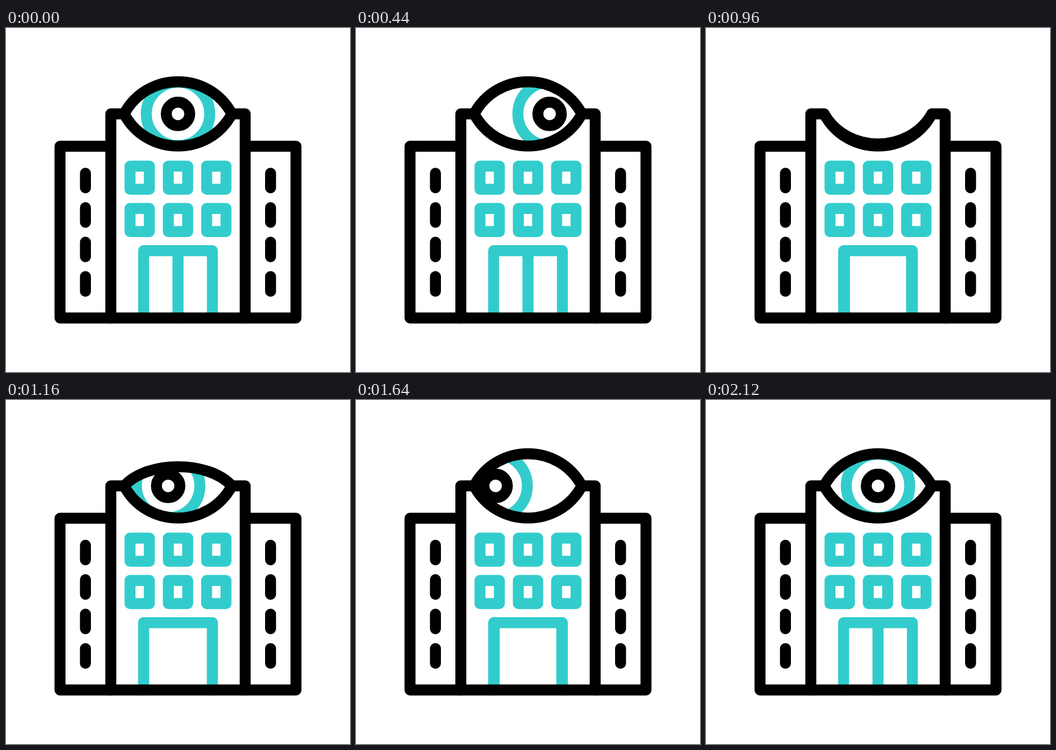
These frames come from a looping animation (640 px wide and 640 px high, 2200 ms). An HTML page:

```html
<!DOCTYPE html>
<html lang="en">
<head>
<meta charset="utf-8">
<title>Watching building</title>
<style>
  html, body { margin: 0; width: 100%; height: 100%; overflow: hidden; background: #fff; }
  svg { display: block; width: 100%; height: 100%; }
  .line { fill: none; stroke: #000; stroke-width: 20.4; stroke-linecap: round; stroke-linejoin: round; }
  .teal { stroke: #3cc; }
</style>
</head>
<body>
<svg viewBox="0 0 640 640">
  <defs>
    <clipPath id="opening"><path id="lens"/></clipPath>
    <rect id="window" width="36" height="43"/>
    <path id="slits" d="M0 270.2v27.2m0 36.9v27.2m0 36.9v27.2m0 36.9v27.2"/>
  </defs>

  <g class="line teal">
    <use href="#window" x="230.7" y="257"/>
    <use href="#window" x="302" y="257"/>
    <use href="#window" x="373.3" y="257"/>
    <use href="#window" x="230.7" y="335.7"/>
    <use href="#window" x="302" y="335.7"/>
    <use href="#window" x="373.3" y="335.7"/>
    <path id="leftDoor" d="M320 414.3V539.5"/>
    <path id="rightDoor" d="M320 414.3V539.5"/>
    <path d="M256 539.5V414.3H384V539.5"/>
  </g>

  <g class="line">
    <path d="M195 220H100.5V539.5H539.5V220H445"/>
    <path d="M195 539.5V159.8H219.8M420.2 159.8H445V539.5"/>
    <use href="#slits" x="147.8"/>
    <use href="#slits" x="492.2"/>
  </g>

  <g clip-path="url(#opening)">
    <g id="iris" class="line">
      <circle class="teal" cx="320" cy="159.8" r="59"/>
      <circle cx="320" cy="159.8" r="21.8"/>
    </g>
  </g>
  <path id="lids" class="line"/>
</svg>

<script>
  const STEP = 40, LOOP = 2200;
  const $ = id => document.getElementById(id);
  const [lens, lids, iris, leftDoor, rightDoor] =
    ["lens", "lids", "iris", "leftDoor", "rightDoor"].map($);

  // Cubic easing (1/3, 0, x2, 1), solved by bisection.
  function ease(p, x2) {
    if (p <= 0) return 0;
    if (p >= 1) return 1;
    let lo = 0, hi = 1, s;
    for (let i = 0; i < 24; i++) {
      s = (lo + hi) / 2;
      const r = 1 - s;
      const x = r * r * s + 3 * r * s * s * x2 + s * s * s;
      if (x < p) lo = s; else hi = s;
    }
    return s * s * (3 - 2 * s);
  }

  const move = (t, from, to, x2 = 2 / 3) => ease((t - from) / (to - from), x2);

  function draw(t) {
    const gaze = 62 * (move(t, 200, 600) - 2 * move(t, 800, 1400) + move(t, 1600, 2000));
    const shut = move(t, 600, 920, 0.495) - move(t, 920, 1320, 0.412);
    const gap = 64 * (move(t, 520, 1040, 0.412) - move(t, 1600, 2120, 0.412));

    const lidY = 80 + 159.6 * shut;
    const eye = `M219.8 159.8C262.8 ${lidY} 377.2 ${lidY} 420.2 159.8` +
      "C377.2 239.6 262.8 239.6 219.8 159.8Z";
    lens.setAttribute("d", eye);
    lids.setAttribute("d", eye);
    iris.setAttribute("transform", `translate(${gaze})`);
    leftDoor.setAttribute("transform", `translate(${-gap})`);
    rightDoor.setAttribute("transform", `translate(${gap})`);
  }

  const start = performance.now();
  function tick() {
    const t = (performance.now() - start) % LOOP;
    draw(Math.floor(t / STEP) * STEP);
    requestAnimationFrame(tick);
  }
  tick();
</script>
</body>
</html>
```
